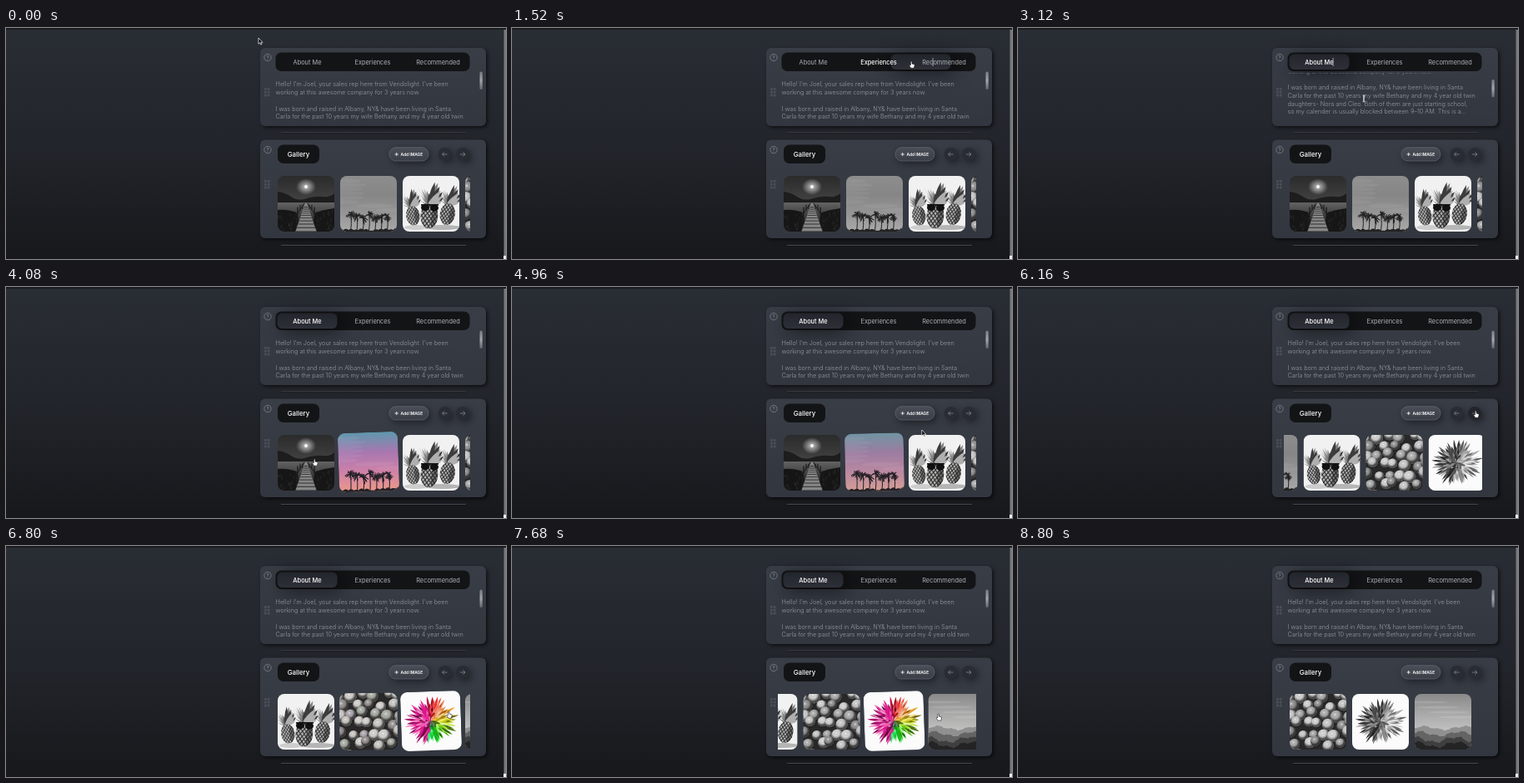
Write an HTML page that moves like this. It is 600 by 278 pixels and loops after 9.12 s.

```html
<!DOCTYPE html>
<html lang="en">
<head>
<meta charset="utf-8">
<title>Profile cards</title>
<style>
  html, body { margin: 0; width: 100%; height: 100%; overflow: hidden; background: #1b1d21; }
  svg { display: block; width: 100vw; height: 100vh; }
  text { font-family: Inter, Roboto, sans-serif; }
  .card { fill: url(#panel); filter: drop-shadow(2px 2px 2px rgba(0,0,0,.6)); }
  .raised { filter: drop-shadow(3px 3px 4px rgba(0,0,0,.45)); }
  .tab { font-size: 7.4px; text-anchor: middle; fill: #aeb1b6; }
  .copy { font-size: 7.28px; font-weight: 300; fill: #989ba1; }
  #pill rect { filter: drop-shadow(5px 3px 11px rgba(0,0,0,.6)); }
</style>
</head>
<body>
<svg viewBox="0 0 600 278" preserveAspectRatio="none" id="stage"></svg>
<script>
const LOOP = 9120, STEP = 80;
const stage = document.getElementById('stage');

let seed = 7;
const rand = () => (seed = (seed * 16807) % 2147483647) / 2147483647;
const repeat = (n, fn) => Array.from({ length: n }, (_, i) => fn(i)).join('');
const rect = (x, y, w, h, r, attrs) =>
  `<rect x="${x}" y="${y}" width="${w}" height="${h}" rx="${r}" ${attrs}/>`;
const ellipse = (x, y, rx, ry, attrs) =>
  `<ellipse cx="${x}" cy="${y}" rx="${rx}" ry="${ry}" ${attrs}/>`;
const path = (d, attrs) => `<path d="${d}" ${attrs}/>`;
const fillAll = fill => rect(0, 0, 68, 68, 0, `fill="${fill}"`);
const gradient = (id, ...colors) =>
  `<linearGradient id="${id}" x2="0" y2="1">${colors.map((c, i) =>
    `<stop offset="${i / (colors.length - 1)}" stop-color="${c}"/>`).join('')}</linearGradient>`;

// Gallery pictures, each 68 x 68
function pier() {
  const posts = repeat(5, i => {
    const y = 38 + i * i * 1.5, w = 4 + i * 3, h = 3 + i * 1.7;
    return [-1, 1].map(s => rect(34 + s * w - .6, y - h, 1 + i * .15, h + 2, 0, 'fill="#1a181d"')).join('');
  });
  const planks = repeat(13, i => {
    const y = 37 + i * i * .2 + i * .1, w = (y - 32) * .36;
    return path(`M${34 - w} ${y}H${34 + w}`, `stroke="#2a272a" stroke-width="${.4 + i * .05}"`);
  });
  const grass = repeat(70, () => {
    const x = rand() * 68, y = 44 + rand() * 24;
    return path(`M${x} ${y}l${rand() * 2 - 1} -3`, 'stroke="#3a373c" stroke-width=".5"');
  });
  return fillAll('url(#dusk)')
    + ellipse(34, 13, 12, 10, 'fill="url(#glow)"') + ellipse(34, 13, 1.9, 1.9, 'fill="#fff"')
    + path('M0 19Q9 20 16 25T32 28Q45 24 54 25T68 21V34H0Z', 'fill="#1d1c22"')
    + rect(0, 32, 68, 36, 0, 'fill="url(#lake)"')
    + path('M0 41Q14 40 24 45L26 68H0ZM68 39Q52 41 44 45L42 68H68Z', 'fill="#161519"') + grass
    + path('M33 33H35L47 68H21Z', 'fill="#8d8684"') + planks + posts
    + path('M32 33L17 56M36 33L51 56', 'stroke="#1c1a1f" stroke-width="1"');
}

function palms() {
  const palm = (x, y) => path(`M${x} ${y}Q${x + 1} 58 ${x - .5} 68`, 'stroke-width="1"')
    + repeat(22, () => {
      const a = rand() * Math.PI * 2, r = 3.5 + rand() * 2.8, dx = Math.cos(a) * r, dy = Math.sin(a) * r;
      return path(`M${x} ${y}q${dx * .6} ${dy * .7 - 1} ${dx} ${dy + 1.2}`, 'stroke-width=".9"');
    });
  return fillAll('url(#sunset)')
    + repeat(8, i => ellipse(rand() * 68, 6 + i * 5, 22, 2.5, 'fill="#fff" opacity=".05"'))
    + '<g fill="none" stroke="#252128">'
    + repeat(7, i => palm(13 + i * 7.3, 45 + rand() * 7)) + '</g>'
    + repeat(12, i => ellipse(i * 6 + 1, 68, 4, 2 + rand() * 3, 'fill="#252128"'));
}

function pineapples() {
  const pineapple = (x, y, size, tilt) => `<g transform="translate(${x} ${y}) rotate(${tilt}) scale(${size})">`
    + repeat(17, i => {
      const a = (i * 5 % 17 - 8) * .13, l = 14 + (i * 7 % 5) * 3, tx = Math.sin(a) * l, ty = -8 - Math.cos(a) * l;
      return path(`M-3 -9Q${tx * .3 - 3} ${ty * .7} ${tx} ${ty}Q${tx * .6 + 3} ${ty * .6} 3 -9Z`,
        `fill="${['#2c4229', '#9db88d', '#6f8a62'][i % 3]}"`);
    })
    + ellipse(0, 2, 9, 13, 'fill="#d0b163"')
    + '<g clip-path="url(#fruit)">'
    + repeat(11, i => path(`M${i * 4 - 28} -14l24 32M${28 - i * 4} -14l-24 32`, 'stroke="#3d3420" stroke-width="1"'))
    + ellipse(7, 5, 5, 15, 'fill="#241d12" opacity=".45"')
    + '</g></g>';
  return fillAll('#f1f1f0') + ellipse(48, 62, 22, 3, 'fill="#b5b5b5"') + ellipse(16, 62, 14, 3, 'fill="#cdcdcd"')
    + pineapple(12, 46, .9, -8) + pineapple(54, 44, 1, 8) + pineapple(32, 46, 1.15, 4)
    + '<g fill="#111">' + ellipse(27, 38, 5, 4.3, '') + ellipse(38, 38.5, 5, 4.3, '')
    + rect(22, 34, 21, 1.8, .5, '') + '</g>';
}

function balls() {
  const tints = ['#d6d0bf', '#bba6bd', '#a9b597', '#e0d8cc', '#a0908a'];
  return fillAll('#2b2725') + repeat(38, i => {
    const row = Math.floor(i / 6);
    const x = (i % 6) * 13.5 + (row % 2) * 6 - 3 + rand() * 8;
    const y = row * 11.5 + rand() * 7 - 2, r = 5.6 + rand() * 2;
    return ellipse(x + .8, y + 1, r, r, 'fill="#111" opacity=".5"')
      + ellipse(x, y, r, r, `fill="${tints[Math.floor(rand() * 5)]}"`)
      + ellipse(x, y, r, r, 'fill="url(#sphere)"');
  });
}

function flower() {
  return fillAll('#fbfbfb') + '<g transform="translate(34 34) scale(1 .9)">'
    + repeat(7, ring => {
      const count = 34 - ring * 3;
      return repeat(count, i => {
        const a = ((i + rand()) / count) * 360 - 180;
        const hue = Math.abs(a) < 100 ? (a + 90) * .8 - 10 : 325;
        const len = (33 - ring * 4.2) * (.78 + rand() * .22), w = 2.4 + rand();
        return path(`M0 0Q${len * .7} ${-w} ${len} 0Q${len * .7} ${w} 0 0Z`,
          `transform="rotate(${a})" fill="hsl(${hue} 85% ${22 + rand() * 58}%)"`);
      });
    })
    + ellipse(1, 3, 5, 4, 'fill="#302528" opacity=".5"') + '</g>';
}

function mountains() {
  const ridge = (y, amp, fill) => {
    let d = `M0 68V${y}`;
    for (let x = 0; x <= 68; x += 2)
      d += `L${x} ${y + amp * (Math.sin(x * .13 + y) + .45 * Math.sin(x * .37 + y * 2) + .2 * Math.sin(x * 1.1))}`;
    return path(d + 'V68Z', `fill="${fill}"`);
  };
  return fillAll('url(#haze)')
    + repeat(4, i => ellipse(15 + i * 13, 10 + i * 6, 25, 1.4, 'fill="#fff" opacity=".12"'))
    + ridge(41, 2, '#8f9095') + ridge(48, 2.5, '#62646a') + ridge(55, 3, '#3d3f45') + ridge(61, 3, '#222429');
}

const pictures = [pier, palms, pineapples, balls, flower, mountains];
const tabs = ['About Me', 'Experiences', 'Recommended'];
const TAB_X = 361.5, TAB_GAP = 78.5;
const copy = [
  'Hello! I’m Joel, your sales rep here from Vendolight. I’ve been',
  'working at this awesome company for 3 years now.',
  '',
  'I was born and raised in Albany, NY&amp; have been living in Santa',
  'Carla for the past 10 years my wife Bethany and my 4 year old twin',
  'daughters- Nora and Cleo. Both of them are just starting school,',
  'so my calender is usually blocked between 9–10 AM. This is a...'
];

const cardTools = y => `<g transform="translate(314 ${y})">`
  + '<circle r="4.2" fill="none" stroke="#8a8d93" stroke-width=".7"/>'
  + '<text y="2.2" font-size="6" text-anchor="middle" fill="#92959b">?</text>'
  + repeat(6, i => rect(-4 + (i % 2) * 3.8, 36.5 + Math.floor(i / 2) * 3.8, 2.8, 2.8, .6, 'fill="#4b4f58"')) + '</g>';
const divider = y => rect(330, y, 222, 1, .5, 'fill="#46494f"') + rect(330, y + 1, 222, .7, .3, 'fill="#101114"');
const arrowButton = (x, dir, id) => `<circle id="${id}" class="raised" cx="${x}" cy="152" r="8" fill="#292c33"/>`
  + path(`M${x - 3 * dir} 152h${6 * dir}m${-2.5 * dir} -2.5l${2.5 * dir} 2.5l${-2.5 * dir} 2.5`,
    'fill="none" stroke="#858991" stroke-width=".8"');

stage.innerHTML = `<defs>
  ${gradient('page', '#292d34', '#22252b', '#17181c')}
  ${gradient('panel', '#383d46', '#32363f')}
  ${gradient('pillFill', '#23252c', '#2d3038')}
  ${gradient('button', '#4a4e57', '#3a3e47')}
  ${gradient('thumb', '#777b83', '#a3a6ac', '#62666e')}
  ${gradient('dusk', '#2b2a33', '#48424b', '#77686a')}
  ${gradient('lake', '#66626a', '#38363e', '#1b1a1f')}
  ${gradient('sunset', '#5f98ad', '#a877b0', '#d082a8', '#ec9a86')}
  ${gradient('haze', '#86898f', '#aaa7a5', '#c9c1ba', '#aaa')}
  <radialGradient id="glow"><stop stop-color="#fff" stop-opacity=".7"/><stop offset="1" stop-color="#fff" stop-opacity="0"/></radialGradient>
  <radialGradient id="sphere" cx=".4" cy=".33"><stop stop-color="#fff" stop-opacity=".7"/><stop offset=".5" stop-color="#777" stop-opacity=".05"/><stop offset="1" stop-color="#111" stop-opacity=".7"/></radialGradient>
  <clipPath id="rounded">${rect(0, 0, 68, 67, 8, '')}</clipPath>
  <clipPath id="fruit">${ellipse(0, 2, 9, 13, '')}</clipPath>
  <clipPath id="copyArea">${rect(320, 54.3, 240, 57.7, 0, '')}</clipPath>
  <clipPath id="strip">${rect(319, 165, 238, 88, 0, '')}</clipPath>
</defs>
${rect(0, 0, 600, 278, 0, 'fill="url(#page)"')}
${rect(0, 0, 600, 2, 0, 'fill="#191b1f"')}
${rect(597.5, 2, 2.5, 276, 0, 'fill="#77797c"')}
${rect(597, 274, 3, 4, 0, 'fill="#f2f2f2"')}
${rect(305, 24, 271, 94, 6, 'class="card"')}
${rect(305, 134.5, 271, 118.5, 6, 'class="card"')}
${divider(125.5)}${divider(261)}
${cardTools(35.5)}${cardTools(146.5)}
${rect(323.5, 29.5, 233, 22.5, 7, 'fill="#131416"')}
<g id="pill">${rect(-36, 31.5, 72, 18.5, 6, 'fill="url(#pillFill)"')}</g>
${tabs.map((name, i) => `<text class="tab" x="${TAB_X + i * TAB_GAP}" y="43.6">${name}</text>`).join('')}
${rect(0, 36, .7, 10, 0, 'id="caret" fill="#d5d7da"')}
<g clip-path="url(#copyArea)"><g id="copy">
  ${copy.map((line, i) => `<text class="copy" x="323.5" y="${70.4 + i * 9.75}">${line}</text>`).join('')}
</g></g>
${rect(568.5, 52.5, 3.2, 21.5, 1.5, 'id="scrollThumb" fill="url(#thumb)"')}
${rect(326, 140.5, 50, 22.5, 7, 'fill="#131416"')}
<text x="351" y="154.5" font-size="7.85" font-weight="500" text-anchor="middle" fill="#fff">Gallery</text>
${rect(460, 143.7, 47, 16.3, 8, 'class="raised" fill="url(#button)" stroke="#656973" stroke-width=".7"')}
${path('M466.6 152h4.2m-2.1 -2.1v4.2', 'stroke="#fff" stroke-width=".8"')}
<text x="473.5" y="153.8" font-size="4.9" font-weight="600" fill="#fff">Add IMAGE</text>
${arrowButton(526.5, -1, 'prev')}${arrowButton(548, 1, 'next')}
<g clip-path="url(#strip)">${pictures.map(draw => `<g class="picture"><g clip-path="url(#rounded)">${draw()}</g></g>`).join('')}</g>
<g id="cursor" stroke-linejoin="round">
  <path data-kind="arrow" d="M0 0V7.2L1.7 5.7L2.8 8L3.9 7.5L2.8 5.3H5Z" fill="#000" stroke="#fff" stroke-width=".7"/>
  <path data-kind="hand" d="M-1.6 -3.5Q-.8 -4.6 0 -3.5V-.9L2.7 -.3Q3.3 0 3.1 1.2L2.3 4.2H-1.3L-3.2 1.2Q-3 0 -1.6 .8Z" fill="#fff" stroke="#111" stroke-width=".6"/>
  <path data-kind="beam" d="M-1.5 -4Q0 -4 0 -3V3Q0 4 -1.5 4M1.5 -4Q0 -4 0 -3V3Q0 4 1.5 4" fill="none" stroke="#eee" stroke-width=".8"/>
</g>`;

const el = id => document.getElementById(id);
const tabLabels = [...document.querySelectorAll('.tab')];
const pictureNodes = [...document.querySelectorAll('.picture')];
const cursorKinds = [...el('cursor').children];

const ease = u => u <= 0 ? 0 : u >= 1 ? 1 : u < .5 ? 4 * u ** 3 : 1 - (2 - 2 * u) ** 3 / 2;
const tween = (t, start, duration) => ease((t - start) / duration);

// [time, x, y]
const cursorPath = [
  [0, 303, 12], [320, 358, 42], [560, 436, 43], [800, 508, 43], [1240, 510, 44],
  [1520, 480, 44], [1680, 440, 44], [1840, 364, 44], [2240, 366, 45], [2560, 415, 85],
  [3600, 415, 85], [3840, 434, 200], [3960, 430, 208], [4080, 371, 211], [4560, 366, 213],
  [5200, 550, 153], [6240, 550, 153], [6480, 445, 204], [6800, 532, 203],
  [7760, 512, 206], [8000, 440, 202], [8320, 262, 92], [8560, 188, -12]
];
// [picture, enter time, leave time]
const hovers = [
  [1, 3720, 4060], [0, 4060, 4680], [1, 4780, 4910], [2, 4910, 5060],
  [3, 6420, 6620], [4, 6540, 7600], [5, 7600, 7920], [4, 7920, 8120], [3, 8120, 8220]
];
const HOVER_TIME = 320;
// [click time, tab]
const clicks = [[320, 0], [560, 1], [800, 2], [1395, 1], [1800, 0]];

function cursorAt(t) {
  const next = cursorPath.findIndex(p => p[0] > t);
  if (next < 0) return cursorPath.at(-1).slice(1);
  const [t0, x0, y0] = cursorPath[next - 1], [t1, x1, y1] = cursorPath[next];
  const u = (t - t0) / (t1 - t0), s = u * u * (3 - 2 * u);
  return [x0 + (x1 - x0) * s, y0 + (y1 - y0) * s];
}

const overNext = (x, y) => Math.hypot(x - 548, y - 152) < 9;

function cursorKind(x, y) {
  const inColumn = x > 323 && x < 557;
  if (overNext(x, y) || inColumn && (y > 30 && y < 53 || y > 178 && y < 246)) return 'hand';
  return inColumn && y > 58 && y < 114 ? 'beam' : 'arrow';
}

function drawTabs(t) {
  let position = 0, active = -1;
  for (const [time, tab] of clicks) {
    if (t < time) break;
    position += (tab - Math.max(active, 0)) * tween(t, time, 280);
    active = tab;
  }
  el('pill').setAttribute('transform', `translate(${TAB_X + position * TAB_GAP} 0)`);
  el('pill').style.opacity = tween(t, 320, 200);
  tabLabels.forEach((label, i) => {
    label.style.fill = i === active ? '#fff' : '';
    label.style.fontWeight = i === active ? 500 : 400;
  });

  const late = t >= 1800, since = t - (late ? 1840 : 880);
  const blinkOn = since >= 0 && since % 640 < 320 && t < 5200;
  el('caret').setAttribute('x', late ? 377.7 : 504.7);
  el('caret').style.opacity = blinkOn ? 1 : 0;
}

function drawCopy(t) {
  const scroll = tween(t, 2560, 320) - tween(t, 3120, 320);
  el('copy').setAttribute('transform', `translate(0 ${-25.5 * scroll})`);
  el('scrollThumb').setAttribute('y', 52.5 + 9.5 * scroll);
}

function drawGallery(t) {
  const scroll = 75 * (tween(t, 5360, 420) + tween(t, 5900, 420) + tween(t, 7440, 420));
  pictureNodes.forEach((node, i) => {
    const hover = hovers.filter(h => h[0] === i).reduce((sum, [, enter, leave]) =>
      sum + tween(t, enter, HOVER_TIME) - tween(t, leave, HOVER_TIME), 0);
    const x = 326 + 75 * i - scroll;
    node.setAttribute('transform',
      `translate(${x + 34} ${211.5 - hover}) rotate(${-2 * hover}) scale(${1 + .06 * hover}) translate(-34 -33.5)`);
    node.style.filter = `grayscale(${1 - hover})`;
  });
}

function drawCursor(t) {
  const [x, y] = cursorAt(t), kind = cursorKind(x, y);
  el('cursor').setAttribute('transform', `translate(${x} ${y})`);
  cursorKinds.forEach(node => { node.style.display = node.dataset.kind === kind ? '' : 'none'; });
  el('next').style.fill = overNext(x, y) ? '#22252b' : '';
}

function frame() {
  const t = Math.floor(performance.now() % LOOP / STEP) * STEP;
  drawTabs(t);
  drawCopy(t);
  drawGallery(t);
  drawCursor(t);
  requestAnimationFrame(frame);
}
frame();
</script>
</body>
</html>
```
